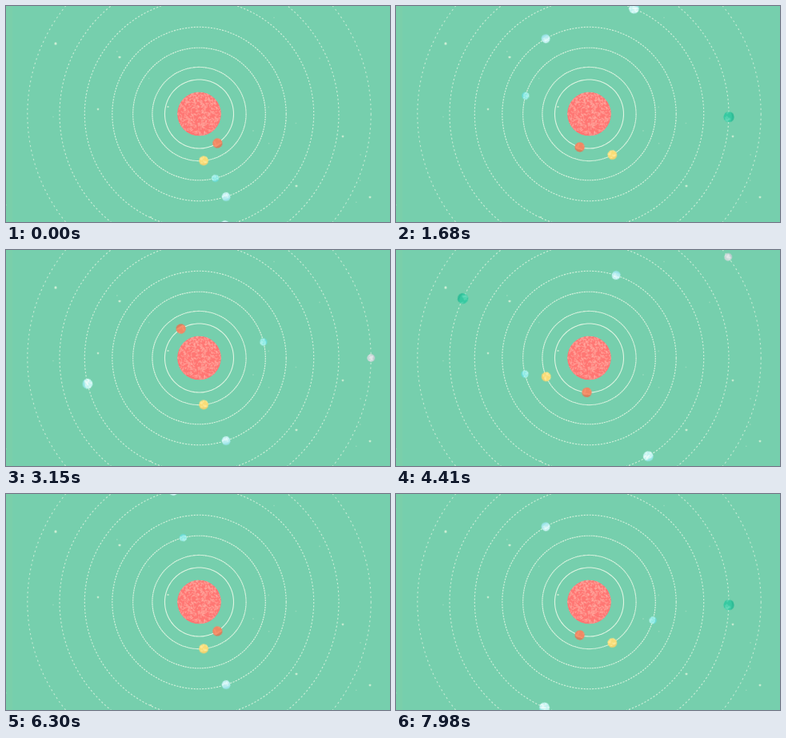
An HTML page that plays this animation: 480x270 px, repeating every 8 s.

```html
<!DOCTYPE html>
<html lang="en">
<head>
<meta charset="utf-8">
<title>Orbits</title>
<style>
  html, body { margin: 0; width: 100%; height: 100%; overflow: hidden; background: #76cfad; }
  svg { display: block; width: 100vw; height: 100vh; }
  /* 114 poses of 70 ms, the last one held until the loop restarts */
  .planet { transform-origin: 0 0; animation: orbit 8s steps(114, end) infinite; }
  @keyframes orbit {
    0% { transform: rotate(var(--from)); }
    99.75%, 100% { transform: rotate(var(--to)); }
  }
</style>
</head>
<body>
<svg viewBox="0 0 480 270">
  <rect width="480" height="270" fill="#76cfad"/>
  <rect width="8" height="270" fill="#7acfaa"/>
  <g id="stars" fill="#dcf3da"></g>
  <g id="system" transform="translate(241.5 135)"></g>
</svg>
<script>
const LAST_POSE = 7980;
const FULL_CYCLE = 12600; // every planet makes a whole number of turns in this time
const system = document.getElementById('system');
const stars = document.getElementById('stars');

function add(parent, tag, attrs) {
  const node = document.createElementNS('http://www.w3.org/2000/svg', tag);
  for (const name in attrs) node.setAttribute(name, attrs[name]);
  return parent.appendChild(node);
}

let seed = 7;
function random() {
  seed = (seed * 16807) % 2147483647;
  return seed / 2147483647;
}

function star(x, y, size, opacity) {
  add(stars, 'rect', { x: x - size / 2, y: y - size / 2, width: size, height: size, rx: .5, opacity });
}

// Disc with short random strokes clipped to its edge
function texturedDisc(parent, id, r, fill, light, count, length, width) {
  add(add(system, 'clipPath', { id }), 'circle', { r });
  const disc = add(parent, 'g', { 'clip-path': `url(#${id})` });
  add(disc, 'circle', { r, fill });
  for (let i = 0; i < count; i++) {
    const angle = random() * Math.PI * 2, distance = r * Math.sqrt(random());
    const x = distance * Math.cos(angle), y = distance * Math.sin(angle);
    const turn = random() * Math.PI * 2, l = length * (.4 + random());
    add(disc, 'path', {
      d: `M${x} ${y}l${l * Math.cos(turn)} ${l * Math.sin(turn)}`,
      stroke: light, 'stroke-width': width, 'stroke-linecap': 'round', opacity: .5
    });
  }
  return disc;
}

const brightStars = [[62, 47], [142, 64], [363, 225], [455, 239], [421, 163], [115, 129], [202.5, 126], [181, 264]];
brightStars.forEach(([x, y], i) => star(x, y, 2.8 - i * .1, .85 - i * .03));
for (let i = 0; i < 16; i++) star(random() * 480, random() * 270, 1.6, .3);

const planets = [
  { orbit: 43, r: 6.2, turns: 14, phase: 58, base: '#f08864', shade: '#cf7c5c', light: '#ffa27c' },
  { orbit: 58.6, r: 6, turns: 8, phase: 84.5, base: '#f9dc76', shade: '#f0d06c', light: '#fff0ae' },
  { orbit: 82.8, r: 4.7, turns: 5, phase: 76, base: '#8ceae4', shade: '#5fd8d6', light: '#d4fbf7' },
  { orbit: 108.7, r: 5.6, turns: 4, phase: 72, base: '#b4ecee', shade: '#94e2e6', light: '#f4ffff' },
  { orbit: 143.2, r: 6.5, turns: 3, phase: 77, base: '#c4f4f1', shade: '#8ae3e3', light: '#ffffff' },
  { orbit: 174.5, r: 6.8, turns: 2, phase: 97.2, base: '#37c9a1', shade: '#2cba94', light: '#72e0c0' },
  { orbit: 214.7, r: 5, turns: 1, phase: 90, base: '#c9d9d8', shade: '#b6c9cb', light: '#f0eef2' }
];

// Outer orbits are fainter and more widely dashed
planets.forEach(({ orbit }) => add(system, 'circle', {
  r: orbit, fill: 'none', stroke: '#f0fbea', 'stroke-width': 1.1,
  'stroke-dasharray': `2.2 ${(orbit - 43) * .021}`, opacity: .92 - orbit / 700
}));

texturedDisc(system, 'sun', 27.5, '#ff7673', '#ffada3', 420, 2, 1.4);

planets.forEach(({ orbit, r, turns, phase, base, shade, light }, i) => {
  const arm = add(system, 'g', { class: 'planet' });
  arm.style.setProperty('--from', `${phase}deg`);
  arm.style.setProperty('--to', `${phase - 360 * turns * LAST_POSE / FULL_CYCLE}deg`);
  const seat = add(arm, 'g', { transform: `translate(${orbit} 0)` });
  const ball = texturedDisc(seat, `planet${i}`, r, base, light, 10, r * .5, 1.5);
  // The side facing away from the sun is darker
  add(ball, 'path', {
    d: `M${r * .35} ${-r}Q${r * .8} 0 ${r * .35} ${r}H${r}V${-r}Z`,
    fill: shade, opacity: .85
  });
});
</script>
</body>
</html>
```
